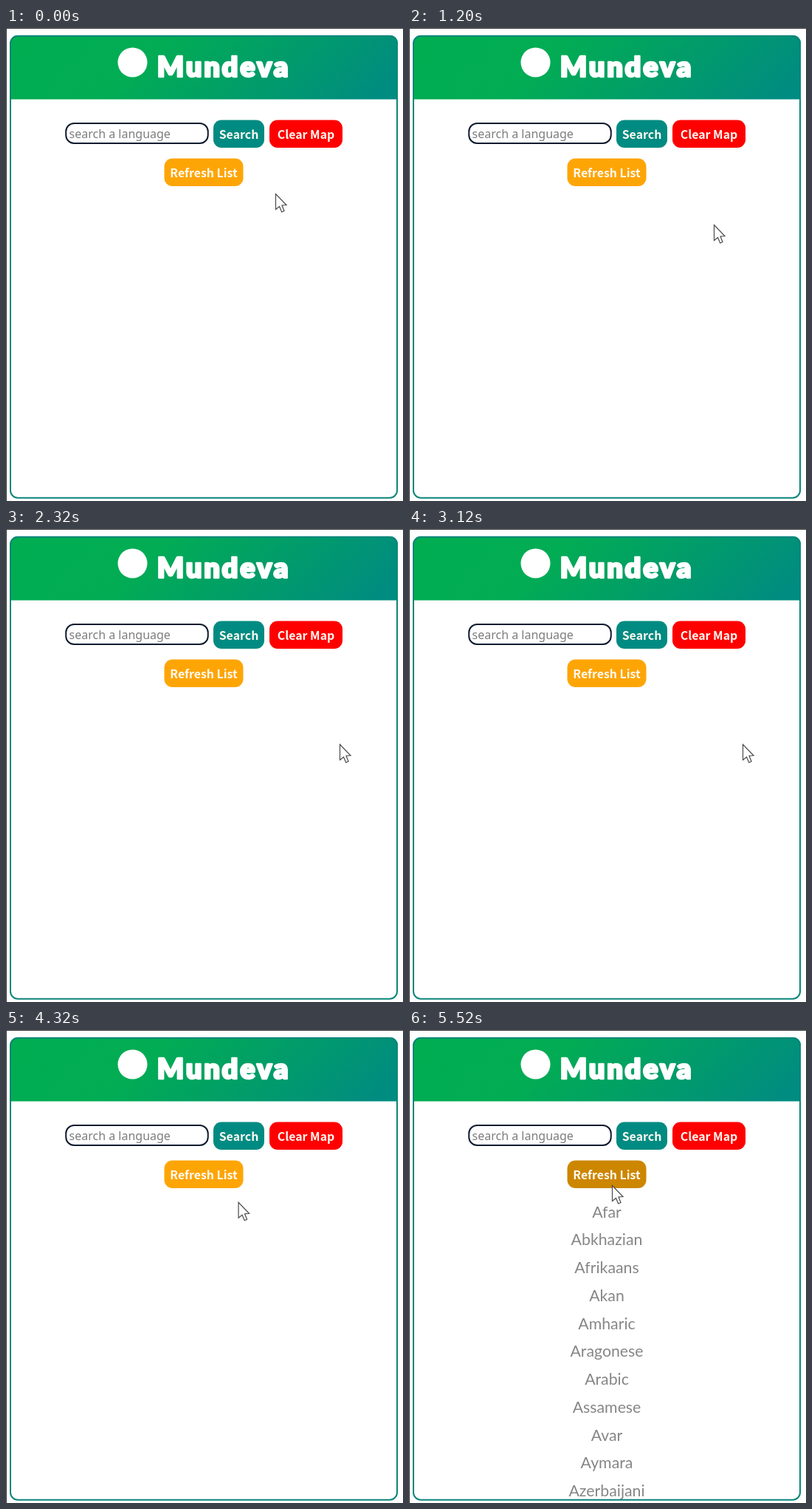
An HTML page with a canvas for the animation above (5600 ms loop, 538 by 640 pixels).

```html
<!DOCTYPE html>
<html lang="en">
<head>
<meta charset="utf-8">
<title>Language list</title>
<style>
html, body { margin: 0; width: 100%; height: 100%; overflow: hidden; background: #fff; }
canvas { display: block; width: 538px; height: 640px; }
</style>
</head>
<body>
<canvas id="stage"></canvas>
<script>
const W = 538, H = 640, LOOP = 5600, STEP = 80;
const HOVER_AT = 4640, LIST_AT = 5360;
const TEAL = '#008b82';
const BUTTON_FONT = 'bold 15.9px "Noto Sans CJK JP", "Noto Sans CJK SC", "Noto Sans", sans-serif';
const LANGUAGES = ['Afar', 'Abkhazian', 'Afrikaans', 'Akan', 'Amharic', 'Aragonese',
  'Arabic', 'Assamese', 'Avar', 'Aymara', 'Azerbaijani'];

// Pointer tip: time, x, y
const PATH = [
  [0, 365, 224], [560, 413, 266], [1360, 413, 266], [2160, 452, 291],
  [3120, 452, 291], [3840, 362, 260], [4720, 275, 210], [LOOP, 275, 210]
];

const canvas = document.getElementById('stage');
const ctx = canvas.getContext('2d');
const ratio = window.devicePixelRatio || 1;
canvas.width = W * ratio;
canvas.height = H * ratio;
ctx.scale(ratio, ratio);

function roundRect(x, y, w, h, r) {
  ctx.beginPath();
  ctx.roundRect(x, y, w, h, r);
}

function text(str, x, y, font, color, align = 'center') {
  ctx.font = font;
  ctx.fillStyle = color;
  ctx.textAlign = align;
  ctx.fillText(str, x, y);
}

function button(label, x, y, w, color) {
  roundRect(x, y, w, 37.5, 11);
  ctx.fillStyle = color;
  ctx.fill();
  text(label, x + w / 2, y + 25, BUTTON_FONT, '#fffaf2');
}

function drawHeader() {
  const g = ctx.createLinearGradient(116, -98, 420, 206);
  g.addColorStop(0, '#00ad50');
  g.addColorStop(0.35, '#02ac54');
  g.addColorStop(0.95, '#008c80');
  g.addColorStop(1, '#008c80');
  roundRect(6, 10, 525, 86.5, [10, 10, 0, 0]);
  ctx.fillStyle = g;
  ctx.fill();

  ctx.beginPath();
  ctx.arc(171.5, 46.5, 20, 0, Math.PI * 2);
  ctx.fillStyle = '#fff';
  ctx.fill();

  ctx.letterSpacing = '2.8px';
  text('Mundeva', 295, 66, '900 38px Lato, sans-serif', '#fff');
  ctx.strokeStyle = '#fff';
  ctx.lineWidth = 2.6;
  ctx.lineJoin = 'round';
  ctx.strokeText('Mundeva', 295, 66);
  ctx.letterSpacing = '0px';
}

function drawPage() {
  ctx.fillStyle = '#fff';
  ctx.fillRect(0, 0, W, H);
  ctx.fillStyle = '#3a3a3a';
  ctx.fillRect(0, 0, W, 1);
  ctx.fillRect(0, 0, 1, H);

  drawHeader();
  roundRect(6, 10.75, 524, 625, 10);
  ctx.strokeStyle = '#0b857a';
  ctx.lineWidth = 2;
  ctx.stroke();

  roundRect(81.25, 129, 192.5, 27, 11);
  ctx.strokeStyle = '#101c30';
  ctx.stroke();
  text('search a language', 85.5, 149, '16px "Noto Sans", sans-serif', '#7d7d7d', 'left');
  button('Search', 281, 124.5, 69, TEAL);
  button('Clear Map', 357, 124.5, 99, '#fe0000');
}

function drawList() {
  LANGUAGES.forEach((name, i) =>
    text(name, 268, 253.5 + i * 37.75, '21.3px Lato, sans-serif', '#868686'));
}

function pointerAt(t) {
  const i = PATH.findIndex(p => p[0] > t);
  const [t0, x0, y0] = PATH[i - 1], [t1, x1, y1] = PATH[i];
  const k = (t - t0) / (t1 - t0);
  return [x0 + (x1 - x0) * k, y0 + (y1 - y0) * k];
}

function drawPointer(x, y) {
  const points = [[0, 0], [0, 21], [5, 17], [8.2, 24.5], [11.5, 23], [8.5, 15.5], [14.5, 15]];
  ctx.save();
  ctx.translate(x + 0.5, y + 0.5);
  ctx.beginPath();
  points.forEach(([px, py]) => ctx.lineTo(px, py));
  ctx.closePath();
  ctx.fillStyle = '#fff';
  ctx.fill();
  ctx.strokeStyle = '#4a4a4a';
  ctx.lineWidth = 1.2;
  ctx.lineJoin = 'miter';
  ctx.stroke();
  ctx.restore();
}

function draw(t) {
  drawPage();
  button('Refresh List', 214.5, 176.5, 107, t >= HOVER_AT ? '#cd8600' : '#fea506');
  if (t >= LIST_AT) drawList();
  drawPointer(...pointerAt(t));
}

const start = performance.now();
function tick() {
  const t = (performance.now() - start) % LOOP;
  draw(Math.floor(t / STEP) * STEP);
  requestAnimationFrame(tick);
}
tick();
</script>
</body>
</html>
```
